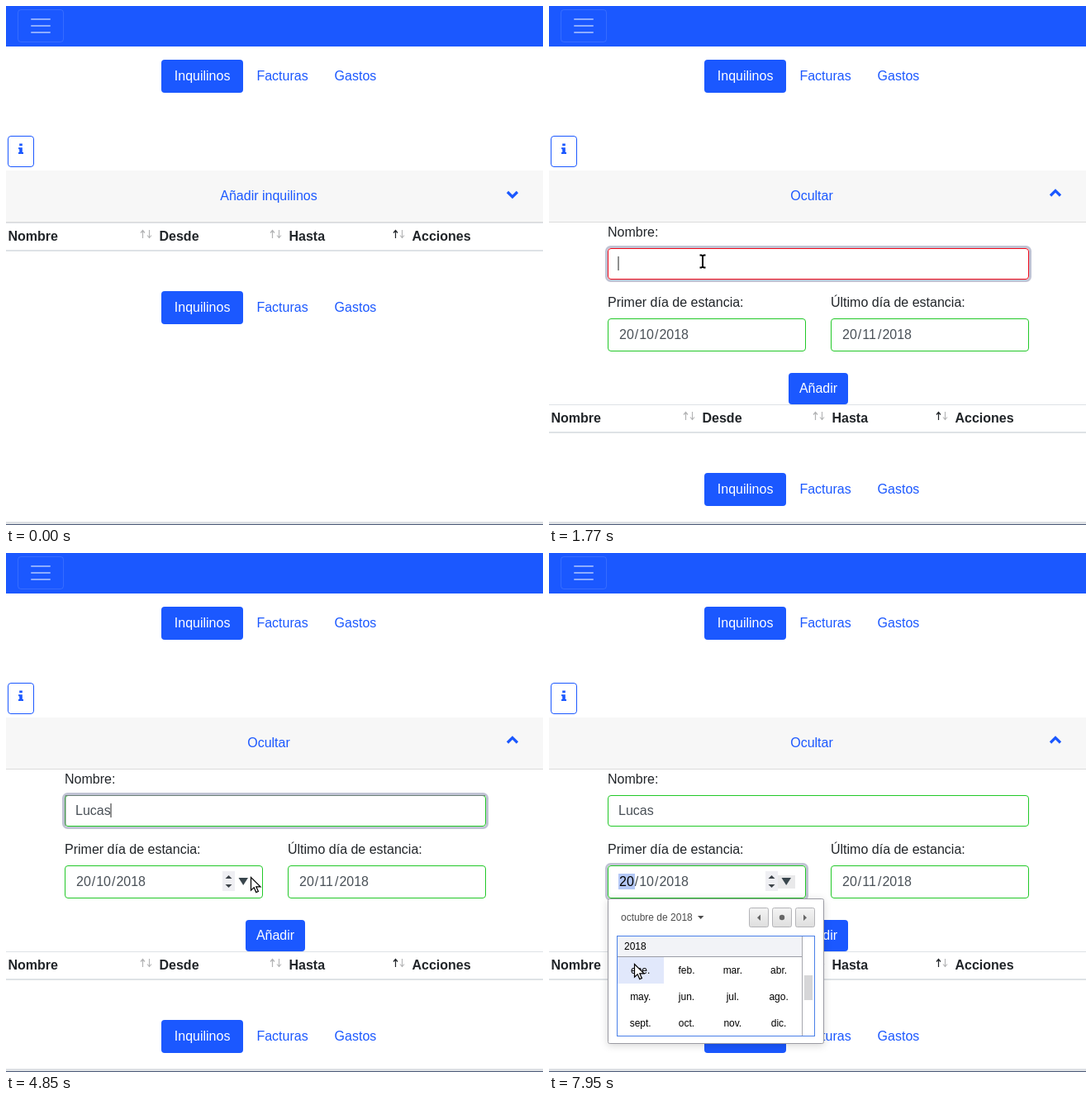
Animation of 650 by 628 pixels, one loop 8 s. Source, as an HTML page:

```html
<!DOCTYPE html>
<html lang="es">
<head>
<meta charset="utf-8">
<title>Inquilinos</title>
<style>
html, body { margin: 0; width: 100%; height: 100%; overflow: hidden; background: #fff; }
svg { display: block; width: 650px; height: 628px; }
text { font: 16px "Liberation Sans", Arial, sans-serif; fill: #212529; white-space: pre; }
.b { font-weight: 700; }
.link { fill: #1b58ff; }
.white { fill: #fff; }
.val { fill: #495057; }
.s { font-size: 12px; fill: #000; }
.dim { fill: #bbb; }
.mid { text-anchor: middle; }
.status { font: 14.75px "Noto Sans", "Open Sans", sans-serif; fill: #555; }
#frame { filter: drop-shadow(0 2px 5px rgba(0,0,0,.16)); }
</style>
</head>
<body>
<svg id="stage" viewBox="0 0 650 628"></svg>
<script>
const BLUE = '#1b58ff', GREEN = [34, 200, 40], RED = [240, 10, 26], RING = '#c0c3d4';
const NAME = 'Lucas', LOOP = 8000;

const rect = (x, y, w, h, fill, more = '') =>
  `<rect x="${x}" y="${y}" width="${w}" height="${h}" fill="${fill}" ${more}/>`;
const box = (x, y, w, h, stroke, fill = '#fff', r = 3.5, more = '') =>
  rect(x + .5, y + .5, w - 1, h - 1, fill, `stroke="${stroke}" rx="${r}" ${more}`);
const text = (x, y, s, cls = '', more = '') => `<text x="${x}" y="${y}" class="${cls}" ${more}>${s}</text>`;
const path = (d, fill, more = '') => `<path d="${d}" fill="${fill}" ${more}/>`;
const line = (d, stroke, w, more = '') => path(d, 'none', `stroke="${stroke}" stroke-width="${w}" ${more}`);
const group = (id, s, more = '') => `<g id="${id}" ${more}>${s}</g>`;
const ring = (id, x, y, w, h, color, sw = 3) =>
  rect(x - 1.5, y - 1.5, w + 3, h + 3, 'none', `id="${id}" rx="5" stroke="${color}" stroke-width="${sw}"`);
const rgb = c => `rgb(${c.join()})`;

const tabs = y => rect(188, y, 99, 40, BLUE, 'rx="4"') +
  text(203.8, y + 25, 'Inquilinos', 'white') +
  text(303.4, y + 25, 'Facturas', 'link') + text(397.6, y + 25, 'Gastos', 'link');

const sortIcon = (x, active) =>
  line(`M${x} 281V271M${x - 2.5} 274.5L${x} 271.5L${x + 2.5} 274.5`, '#212529', 1.2, `opacity="${active ? 1 : .35}"`) +
  line(`M${x + 8} 271V281M${x + 5.5} 277.5L${x + 8} 280.5L${x + 10.5} 277.5`, '#212529', 1.1, 'opacity=".35"');

function dateText(x, month) {
  const parts = [[0, '20'], [18.8, '/'], [24.2, month], [43, '/'], [48.4, '2018']];
  return parts.map(([dx, s], i) => text(x + dx, 403, s, 'val', i ? '' : `id="day${month}"`)).join('');
}

const table = rect(0, 262, 650, 400, '#fff') + rect(0, 262, 650, 1, '#dee2e6') + rect(0, 295, 650, 2, '#dee2e6') +
  text(2.5, 284, 'Nombre', 'b') + text(185.5, 284, 'Desde', 'b') +
  text(342.5, 284, 'Hasta', 'b') + text(491.5, 284, 'Acciones', 'b') +
  sortIcon(165.5) + sortIcon(322.5) + sortIcon(471.5, true) + tabs(345);

const spinner = rect(262, 385, 15, 24, '#efeff3') +
  path('M265.5 394L269.5 390L273.5 394Z M265.5 401L269.5 405L273.5 401Z', '#3c4248') +
  rect(277, 390, 21, 16, '#e9e9ea', 'id="hover"') + path('M281.5 393H293L287.2 402Z', '#39464d');

const form = text(71, 279, 'Nombre:') + ring('nameRing', 71, 293, 510, 38, RING) +
  box(71, 293, 510, 38, rgb(RED), '#fff', 3.5, 'id="nameBox"') +
  line('M72 330V293.5H580', '#6d8278', 1, 'id="inset"') +
  text(84, 317, '', 'val', 'id="name"') + rect(0, 303, 1, 17, '#222', 'id="caret"') +
  text(71, 364, 'Primer día de estancia:') + text(341, 364, 'Último día de estancia:') +
  ring('dateRing', 71, 378, 240, 40, RING) +
  box(71, 378, 240, 40, rgb(GREEN)) + box(341, 378, 240, 40, rgb(GREEN)) +
  rect(84, 388, 20, 19, '#b4c8f6', 'id="select"') +
  dateText(85, '10') + dateText(355, '11') + group('spinner', spinner) +
  rect(290, 444, 72, 38, BLUE, 'rx="4"') + text(326, 468, 'Añadir', 'white mid');

function dayGrid() {
  const names = ['lun.', 'mar.', 'mié.', 'jue.', 'vie.', 'sáb.', 'dom.'];
  let s = box(82, 463, 240, 127, '#5f88d8', '#fff', 0) + rect(83, 464, 238, 24, '#f2f3f7') +
    rect(83, 488, 238, 1, '#9a9ca5') + rect(253, 529, 34, 20, '#b9c6ea');
  names.forEach((n, i) => s += text(100 + 34 * i, 480, n, 's mid'));
  for (let i = 0; i < 35; i++)
    s += text(100 + 34 * (i % 7), 503 + 20 * Math.floor(i / 7), i % 31 + 1, i > 30 ? 's mid dim' : 's mid');
  return s;
}

function monthGrid() {
  const names = 'ene. feb. mar. abr. may. jun. jul. ago. sept. oct. nov. dic.'.split(' ');
  let s = box(82, 463, 240, 122, '#4a80e8', '#fff', 0) + rect(83, 464, 223, 24, '#f2f3f7') +
    rect(83, 488, 223, 1, '#9a9ca5') + rect(306, 464, 1, 120, '#a5a7ad') +
    rect(309, 511, 10, 30, '#d6d6d8') + rect(83, 489, 56, 32, '#e1e8fb', 'id="cell"') + text(91, 480, '2018', 's');
  names.forEach((n, i) => s += text(110.7 + 55.8 * (i % 4), 509 + 32 * Math.floor(i / 4), n, 's mid'));
  return s;
}

const popup = box(71, 418, 262, 183, '#9b9ba3', '#fff', 2, 'id="frame"') +
  group('heading', text(87, 445, 'octubre de 2018', 's') + path('M180 439H187.4L183.7 443Z', '#000')) +
  [242, 270, 298].map(x => box(x, 429, 24, 24, '#b4b4b8', 'url(#btn)', 2)).join('') +
  path('M256 437.5V445L252 441.2Z M308 437.5V445L312 441.2Z', '#666') +
  '<circle cx="282" cy="441" r="3.2" fill="#666"/>' + group('days', dayGrid()) + group('months', monthGrid());

const ibeam = 'M-3.5 -7.5H-1.5L0 -6.5L1.5 -7.5H3.5M0 -6.5V6.5M-3.5 7.5H-1.5L0 6.5L1.5 7.5H3.5';
const cursors =
  group('arrow', path('M.5 .5V16.2L4.2 12.8L6.8 18.6L9.4 17.5L6.8 11.8H12Z', '#fff', 'stroke="#000" stroke-width="1.2"')) +
  group('ibeam', line(ibeam, '#fff', 4) + line(ibeam, '#000', 2)) +
  group('hand', path('M-1.5 10V1Q0 -1 1.5 1V7L9 8.5Q10.5 9 10 11L8.5 18H0L-5.5 11Q-5 8.5 -3 10L-1.5 12Z', '#fff', 'stroke="#000"'));

document.getElementById('stage').innerHTML =
  `<defs><linearGradient id="btn" x2="0" y2="1"><stop stop-color="#f4f4f4"/><stop offset="1" stop-color="#dedede"/></linearGradient>
   <clipPath id="clip">${rect(0, 262, 650, 0, '#000', 'id="reveal"')}</clipPath></defs>` +
  rect(0, 0, 650, 628, '#fff') + rect(0, 0, 650, 49, BLUE) +
  box(14, 4, 56, 40, 'rgba(255,255,255,.12)', 'none') +
  line('M31 16H53M31 24H53M31 32H53', 'rgba(255,255,255,.5)', 2, 'stroke-linecap="round"') + tabs(65) +
  box(2, 157, 32, 38, BLUE) + path('M16.2 166.5H19.8V169.3H16.2Z M15 171.3H19.8V177H21V179H15V177H16.2V173.3H15Z', BLUE) +
  group('table', table) + group('form', form, 'clip-path="url(#clip)"') +
  rect(0, 199, 650, 62, '#f7f7f7') + rect(0, 261, 650, 1, '#dcdcdc') +
  ring('linkRing', 18, 211, 616, 38, '#c5c1f8') + text(318, 235, '', 'link mid', 'id="link"') +
  line('', BLUE, 3.2, 'id="chevron"') +
  rect(0, 624, 650, 3, '#dde0e4') + rect(0, 627, 650, 1, '#4c5a78') +
  group('status', path('M0 601.5H211Q214.5 601.5 214.5 605V624.5H0Z', '#fff', 'stroke="#d3d3d3"') +
    text(1, 618, 'localhost:8080/guests#', 'status')) +
  group('popup', popup) + group('cursor', cursors);

const el = {};
document.querySelectorAll('[id]').forEach(e => el[e.id] = e);
const set = (id, attrs) => { for (const k in attrs) el[id].setAttribute(k, attrs[k]); };
const show = (id, on) => el[id].style.display = on ? '' : 'none';

const ramp = (t, a, b) => Math.min(1, Math.max(0, (t - a) / (b - a)));
const ease = p => p * p * (3 - 2 * p);
const between = (t, a, b) => t >= a && t < b;

// time, x, y of the pointer
const track = [
  [550, 184, 200], [700, 178, 224], [1150, 178, 230], [1300, 180, 262], [1360, 181, 292], [1410, 181, 304],
  [1600, 184, 308], [1700, 186, 309], [4090, 186, 309], [4250, 214, 345], [4400, 262, 392], [4520, 294, 411],
  [4630, 297, 397], [4800, 297, 397], [4850, 296, 392], [5000, 295, 394], [6200, 295, 394], [6400, 280, 402],
  [6700, 220, 432], [6980, 180, 444], [7020, 177, 443], [7520, 177, 443], [7650, 162, 458], [7800, 126, 487],
  [7950, 103, 497]
];
const keys = [2200, 2380, 2540, 3410, 3510];

function pointer(t) {
  const i = track.findIndex(k => k[0] > t);
  if (i < 0) return track[track.length - 1].slice(1);
  if (i === 0) return track[0].slice(1);
  const [a, b] = [track[i - 1], track[i]], p = ramp(t, a[0], b[0]);
  return [a[1] + (b[1] - a[1]) * p, a[2] + (b[2] - a[2]) * p];
}

function draw(t) {
  const [x, y] = pointer(t);
  const open = t >= 850, picking = t >= 5440, months = t >= 7250;

  const h = 220 * ease(ramp(t, 850, 1220));
  set('reveal', { height: h });
  set('table', { transform: `translate(0 ${h})` });
  el.link.textContent = open ? 'Ocultar' : 'Añadir inquilinos';
  set('chevron', { d: open ? 'M607 229.5L613 223.5L619 229.5' : 'M607 225L613 231L619 225' });
  set('linkRing', { opacity: ramp(t, 750, 870) * (1 - ramp(t, 1620, 1770)) });
  set('status', { opacity: ramp(t, 640, 740) * (1 - ramp(t, 1440, 1600)) });

  const focus = ramp(t, 1620, 1770) * (1 - ramp(t, 5390, 5540));
  const valid = ramp(t, 2200, 2350);
  set('nameRing', { opacity: focus });
  set('inset', { opacity: focus * valid });
  set('nameBox', { stroke: rgb(RED.map((c, i) => Math.round(c + (GREEN[i] - c) * valid))) });
  el.name.textContent = NAME.slice(0, keys.filter(k => t >= k).length);
  set('caret', { x: Math.round(84 + el.name.getComputedTextLength()) - .5 });
  show('caret', between(t, 1700, 3130) || between(t, 3410, 4090) || between(t, 4630, 5220));

  set('dateRing', { opacity: ramp(t, 5390, 5540) });
  show('select', t >= 5390);
  el.day10.style.fill = t >= 5390 ? '#000' : '';
  show('spinner', t >= 4370);
  show('hover', t >= 4950);

  show('popup', picking);
  set('frame', { height: months ? 175 : 182 });
  set('heading', { opacity: months ? .7 : 1 });
  show('days', !months);
  show('months', months);
  const over = y >= 489;
  const col = over ? Math.floor((x - 83) / 56) : 1, row = over ? Math.floor((y - 489) / 32) : 2;
  set('cell', { x: 83 + 56 * col, y: 489 + 32 * row, height: row === 2 ? 31 : 32 });

  show('cursor', t >= 550);
  set('cursor', { transform: `translate(${Math.round(x)} ${Math.round(y)})` });
  const kind = between(t, 650, 1280) ? 'hand' : between(t, 1280, 4190) ? 'ibeam' : 'arrow';
  ['arrow', 'ibeam', 'hand'].forEach(k => show(k, k === kind));
}

const start = performance.now();
function tick() {
  draw((performance.now() - start) % LOOP);
  requestAnimationFrame(tick);
}
tick();
</script>
</body>
</html>
```
